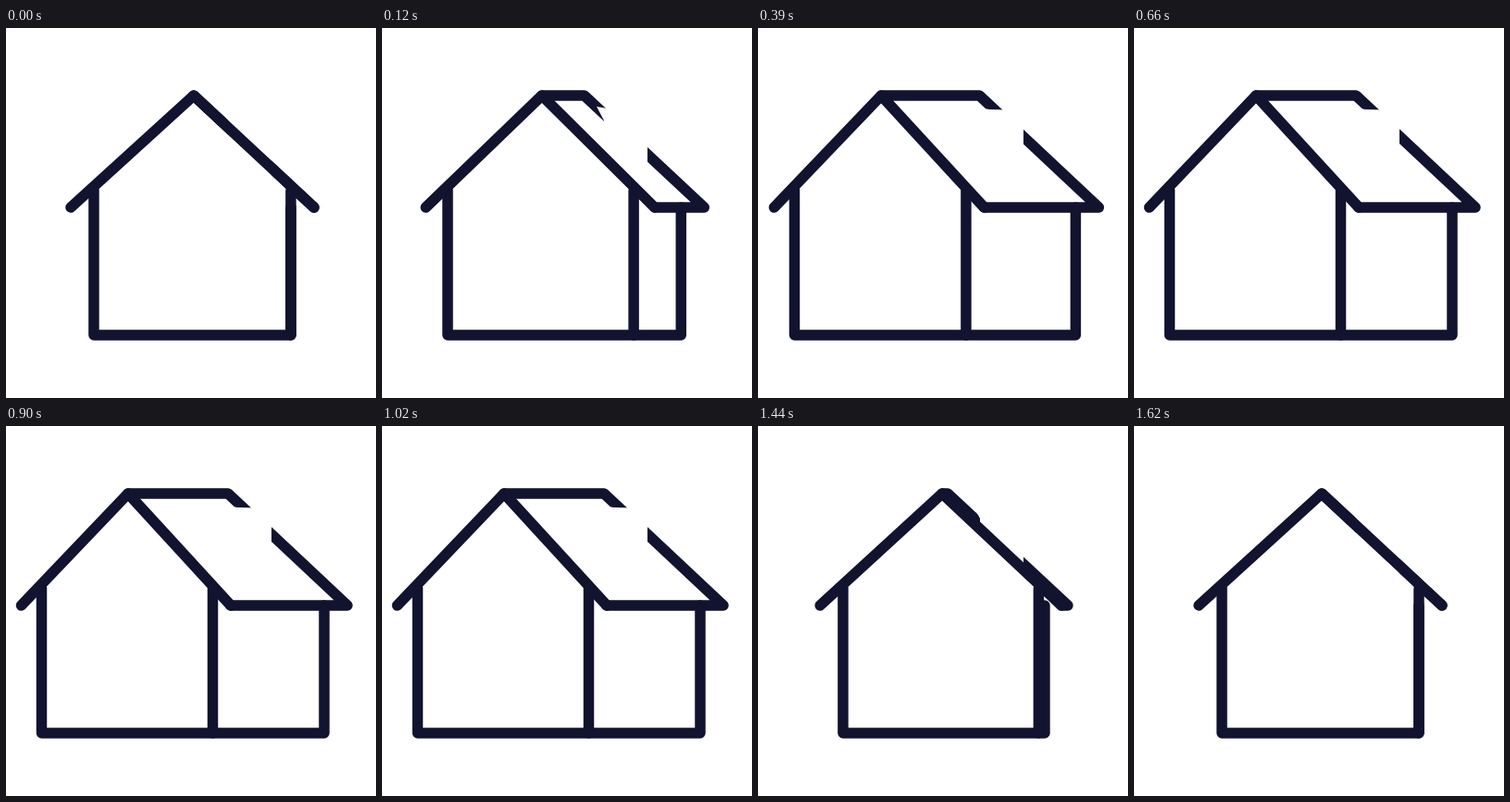
These frames come from a looping animation (400x400 px, 6150 ms). An HTML page:

```html
<!DOCTYPE html>
<html lang="en">
<head>
<meta charset="utf-8">
<title>House</title>
<style>
  html, body {
    margin: 0;
    width: 100%;
    height: 100%;
    overflow: hidden;
    background: #fff;
  }
  svg {
    display: block;
    width: 100%;
    height: 100%;
  }
  .line {
    fill: none;
    stroke: #11132f;
    stroke-width: 11.5;
    stroke-linecap: round;
    stroke-linejoin: round;
    animation: 6150ms ease infinite;
  }
  .gap { fill: #fff; }

  /* Opens over 0-470 ms, stays open to 1050 ms, closes by 1600 ms. */
  .back { animation-name: back; }
  .walls { animation-name: walls; }
  .divider { animation-name: divider; }
  .front { animation-name: front; }

  @keyframes back {
    0%, 26.016%, 100% { d: path("M203 73 L203 73 L333 194 L333 194"); }
    7.642%, 17.073% { d: path("M132 73 L240 73 L369 194 L243 194"); }
  }
  @keyframes walls {
    0%, 26.016%, 100% { d: path("M95 175 L95 332 L308 332 L308 194"); }
    7.642%, 17.073% { d: path("M38.5 175 L38.5 332 L344 332 L344 194"); }
  }
  @keyframes divider {
    0%, 26.016%, 100% { d: path("M308 176 L308 332"); }
    7.642%, 17.073% { d: path("M223.5 176 L223.5 332"); }
  }
  @keyframes front {
    0%, 26.016%, 100% { d: path("M70 194 L203 73 L333 194"); }
    7.642%, 17.073% { d: path("M16.5 194 L132 73 L243 194"); }
  }
</style>
</head>
<body>
<svg viewBox="0 0 400 400">
  <path class="line back" d="M203 73 L203 73 L333 194 L333 194"/>
  <path class="gap" d="M232 85 L250 88 L287 89 L287 160 L240 160 L240 100 Z"/>
  <path class="line walls" d="M95 175 L95 332 L308 332 L308 194"/>
  <path class="line divider" d="M308 176 L308 332"/>
  <path class="line front" d="M70 194 L203 73 L333 194"/>
</svg>
</body>
</html>
```
